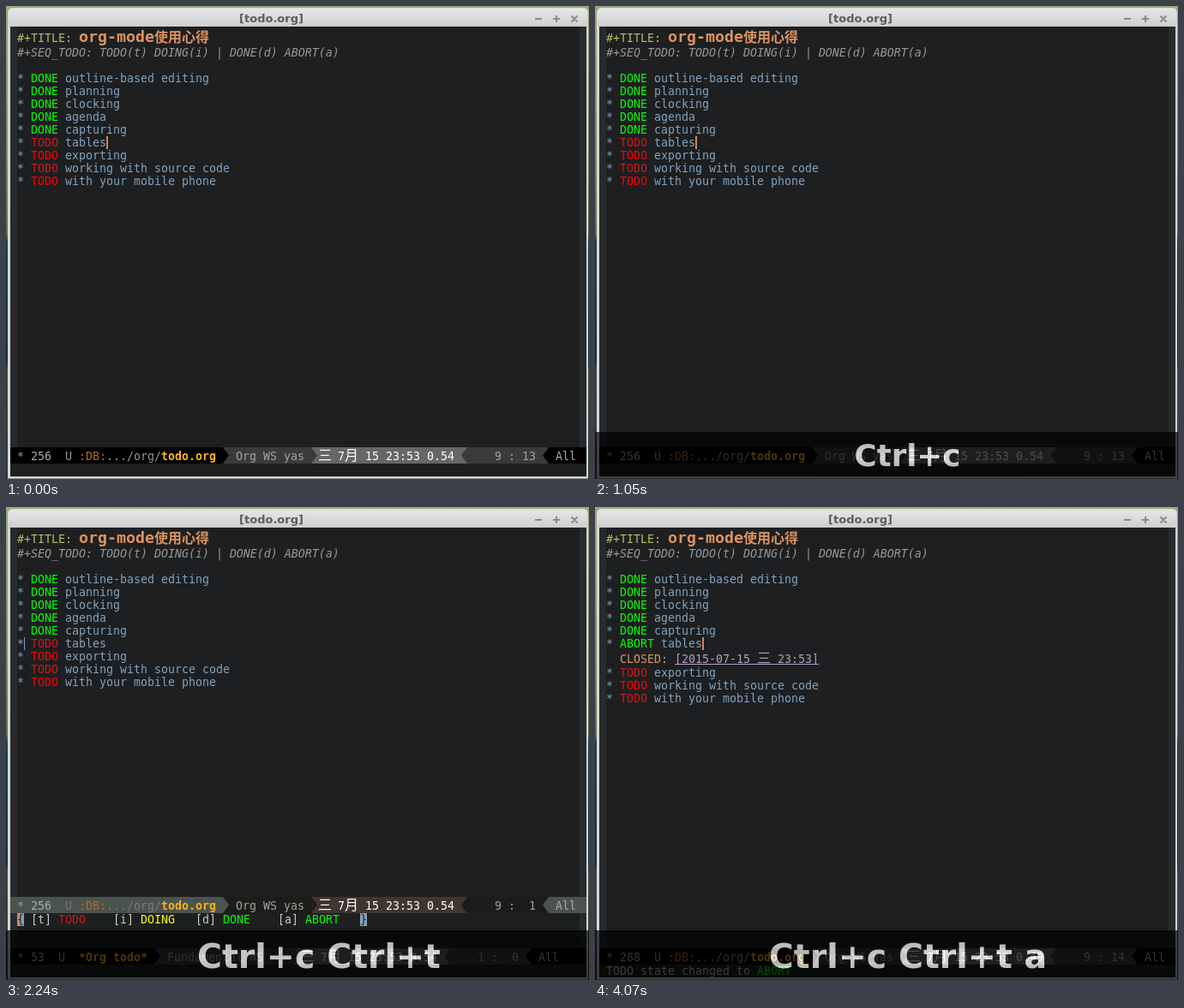
These frames come from a looping animation (680 by 552 pixels, 5.91 s). An HTML page:

```html
<!DOCTYPE html>
<html lang="en">
<head>
<meta charset="utf-8">
<title>Org todo</title>
<style>
  html, body { margin: 0; width: 100%; height: 100%; overflow: hidden; background: #1d1f21; }
  svg { display: block; width: 680px; height: 552px; }
  text { font: 13.29px "DejaVu Sans Mono", monospace; white-space: pre; }
  .b { font-weight: bold; }
  .i { font-style: italic; }
  .big { font-size: 18.27px; font-weight: bold; }
  .han { font: 16px "Noto Sans CJK SC", "Noto Sans CJK", sans-serif; }
  .hanb { font: bold 16px "Noto Sans CJK SC", "Noto Sans CJK", sans-serif; }
  .cap { font: bold 13px "DejaVu Sans", sans-serif; text-anchor: middle; }
  .key { font: bold 39.5px "DejaVu Sans", sans-serif; text-anchor: middle; }
</style>
</head>
<body>
<svg id="stage" viewBox="0 0 680 552">
  <defs>
    <linearGradient id="desk" x1="0" y1="0" x2="0" y2="1">
      <stop offset="0" stop-color="#9aa878"/>
      <stop offset=".33" stop-color="#7b8a52"/>
      <stop offset=".48" stop-color="#5d7048"/>
      <stop offset=".5" stop-color="#1a3f52"/>
      <stop offset=".75" stop-color="#123040"/>
      <stop offset=".77" stop-color="#3b4a38"/>
      <stop offset="1" stop-color="#2b3a30"/>
    </linearGradient>
    <linearGradient id="head" x1="0" y1="0" x2="0" y2="1">
      <stop offset="0" stop-color="#e6e6e6"/>
      <stop offset="1" stop-color="#cfcfcf"/>
    </linearGradient>
  </defs>
</svg>
<script>
const LOOP = 5910, KEY = 930, CHORD = 2190, SPLIT = 2240, TITLE = 2300,
      HINT = 2350, PICK = 4020, DONE = 4070;
const BLUE = '#81a2be', GREY = '#969896', FG = '#c5c8c6', GREEN = '#00ff00',
      RED = '#ff0000', DIM = '#cc1a16', ORANGE = '#de935f', CURSOR = '#d9805f';

const stage = document.getElementById('stage');
const layers = [];

function layer(from, to, markup, parent = stage) {
  const g = document.createElementNS('http://www.w3.org/2000/svg', 'g');
  g.innerHTML = markup;
  parent.append(g);
  layers.push({ g, from, to });
  return g;
}

const text = (x, y, s, fill, cls = '') =>
  `<text x="${x}" y="${y}" fill="${fill}" class="${cls}">${s}</text>`;
const rect = (x, y, w, h, fill) =>
  `<rect x="${x}" y="${y}" width="${w}" height="${h}" fill="${fill}"/>`;
const poly = (pts, fill) => `<polygon points="${pts}" fill="${fill}"/>`;

// An outline heading: star, keyword, label
const row = (y, word, color, label) =>
  text(13, y, '*', BLUE) + text(29, y, word, color) +
  text(37 + word.length * 8, y, label, BLUE);

const ACTIVE = { end: '#000', mid: '#3a3a3a', clock: '#666', dim: GREY };
const IDLE = { end: '#4b534e', mid: '#1c1c1a', clock: '#40352f', dim: '#747c78' };

// Status bar: edge is where the left part ends, dx moves the right part
function bar(y, skin, edge, dx, left, mode, pos) {
  const m = y + 9.5, e = y + 19, base = y + 15;
  const a = 356 + dx, b = 538 + dx, c = 633 + dx;
  return rect(5, y, 672, 19, skin.mid) +
    poly(`5,${y} ${edge},${y} ${edge + 7},${m} ${edge},${e} 5,${e}`, skin.end) +
    poly(`${a},${y} ${b},${y} ${b - 7},${m} ${b},${e} ${a},${e} ${a + 7},${m}`, skin.clock) +
    poly(`677,${y} ${c},${y} ${c - 7},${m} ${c},${e} 677,${e}`, skin.end) +
    left + text(edge + 15, base, mode, '#a3a39b') +
    text(364 + dx, base, '三', '#fff', 'han') + text(387 + dx, base, '7', '#fff') +
    text(395 + dx, base, '月', '#fff', 'han') + text(419 + dx, base, '15 23:53', '#fff') +
    text(570 + dx, base, pos, '#a3a39b') + text(641 + dx, base, 'All', '#a9aca9');
}

const fileInfo = (y, size, skin) =>
  text(13, y, '*', BLUE) + text(29, y, size, '#a4adb0') + text(69, y, 'U', skin.dim) +
  text(85, y, ':DB:', '#ae6a2c') + text(117, y, '.../org/', skin.dim) +
  text(181, y, 'todo.org', '#f5b41a', 'b');

const load = (x, y, s) => text(x, y, s, '#fff');

// Desktop and window frame
layer(0, LOOP,
  rect(0, 0, 680, 552, 'url(#desk)') +
  '<path d="M2 552V8q0-6 6-6H673q6 0 6 6V552z" fill="#d6d6d6"/>' +
  '<path d="M3 24V8q0-5 5-5H673q5 0 5 5V24z" fill="url(#head)"/>' +
  rect(2, 551, 677, 1, '#8c8c8c') +
  rect(5, 24, 672, 525, '#1d1f21') +
  rect(5, 24, 8, 491, '#282a2e') + rect(669, 24, 8, 491, '#282a2e') +
  '<path d="M617 15h8M638 15h8M642 11v8M659.500 11.500l7 7M666.500 11.500l-7 7" stroke="#8a8a8a" stroke-width="2" fill="none"/>');

for (const [from, to, s] of [[0, TITLE, '[todo.org]'], [TITLE, DONE, '[ *Org todo*]'], [DONE, LOOP, '[todo.org]']])
  layer(from, to, text(309.5, 19, s, '#5c5c5c', 'cap'));

// Document
layer(0, LOOP,
  text(13, 42, '#+TITLE:', '#b5bd68') + text(85, 42, 'org-mode', ORANGE, 'big') +
  text(173, 42, '使用心得', ORANGE, 'hanb') +
  text(13, 59, '#+SEQ_TODO: TODO(t) DOING(i) | DONE(d) ABORT(a)', GREY, 'i') +
  ['outline-based editing', 'planning', 'clocking', 'agenda', 'capturing']
    .map((s, i) => row(89 + i * 15, 'DONE', GREEN, s)).join(''));

const rest = ['exporting', 'working with source code', 'with your mobile phone'];
const todos = (y, list, flip) =>
  list.map((s, i) => row(y + i * 15, 'TODO', i % 2 === flip ? DIM : RED, s)).join('');

layer(0, DONE, todos(164, ['tables', ...rest], 0));
layer(0, SPLIT, rect(117, 152, 2, 15, CURSOR));
layer(SPLIT, DONE, rect(21, 152, 1, 15, BLUE));
layer(DONE, LOOP,
  row(164, 'ABORT', GREEN, 'tables') + rect(125, 152, 2, 15, CURSOR) +
  text(29, 182, 'CLOSED:', ORANGE) + text(93, 182, '[2015-07-15', '#b29fc4') +
  text(189, 182, '三', '#b29fc4', 'han') + text(213, 182, '23:53]', '#b29fc4') +
  rect(93, 183, 168, 1, '#b29fc4') + todos(198, rest, 0));

// Status bars
layer(0, SPLIT, bar(515, ACTIVE, 253, 0, fileInfo(530, '256', ACTIVE), 'Org WS yas', '9 : 13') +
  load(491, 530, '0.54'));
layer(DONE, LOOP, bar(515, ACTIVE, 253, 0, fileInfo(530, '288', ACTIVE), 'Org WS yas', '9 : 14') +
  load(491, 530, '0.49'));

// Split view with the keyword menu
const choice = (x, key, word, color) =>
  text(x, 486, `[${key}]`, FG) + text(x + 32, 486, word, color);
layer(SPLIT, DONE,
  bar(455, IDLE, 253, 0, fileInfo(470, '256', IDLE), 'Org WS yas', '9 :  1') +
  rect(13, 474, 8, 15, BLUE) + rect(13, 474, 2, 15, CURSOR) + rect(413, 474, 8, 15, BLUE) +
  text(13, 486, '{', '#1d1f21') + text(413, 486, '}', '#1d1f21') +
  choice(29, 't', 'TODO', DIM) + choice(125, 'i', 'DOING', '#ffff00') +
  choice(221, 'd', 'DONE', GREEN) + choice(317, 'a', 'ABORT', GREEN) +
  bar(515, ACTIVE, 173, -20,
    text(13, 530, '*', BLUE) + text(29, 530, '53', '#a4adb0') + text(61, 530, 'U', GREY) +
    text(85, 530, '*Org todo*', '#f5b41a', 'b'), 'Fundamental WS', '1 :  0'));
for (const [x, y, change] of [[491, 470, 2660], [471, 530, 2700]]) {
  layer(SPLIT, change, load(x, y, '0.54'));
  layer(change, DONE, load(x, y, '0.49'));
}

// Echo area
layer(1830, SPLIT, text(13, 546, 'C-c-', FG));
layer(HINT, DONE, text(13, 546, '[a-z..]:Set [SPC]:clear', FG));
layer(DONE, LOOP, text(13, 546, 'TODO state changed to', FG) + text(189, 546, 'ABORT', GREEN));

// Key display, drawn around its own centre
const keys = layer(KEY, LOOP, rect(-672, -30.5, 1344, 61, '#000'));
keys.setAttribute('opacity', .7);
for (const [from, to, s] of [[KEY, CHORD, 'Ctrl+c'], [CHORD, PICK, 'Ctrl+c Ctrl+t'], [PICK, LOOP, 'Ctrl+c Ctrl+t a']])
  layer(from, to, text(6, 13.5, s, '#fff', 'key'), keys);

const popSteps = [930, 970, 1010, 1050, 1090, 1140];
function popScale(t) {
  const step = popSteps.filter(s => s <= t).pop() ?? KEY;
  const u = Math.min(1, (step - 898) / 222);
  return 1 - (1 - u) ** 2;
}

function draw(t) {
  for (const { g, from, to } of layers)
    g.style.display = t >= from && t < to ? '' : 'none';
  keys.setAttribute('transform', `translate(359 524.5) scale(${popScale(t)})`);
}

const start = performance.now();
function tick() {
  draw((performance.now() - start) % LOOP);
  requestAnimationFrame(tick);
}
tick();
</script>
</body>
</html>
```
